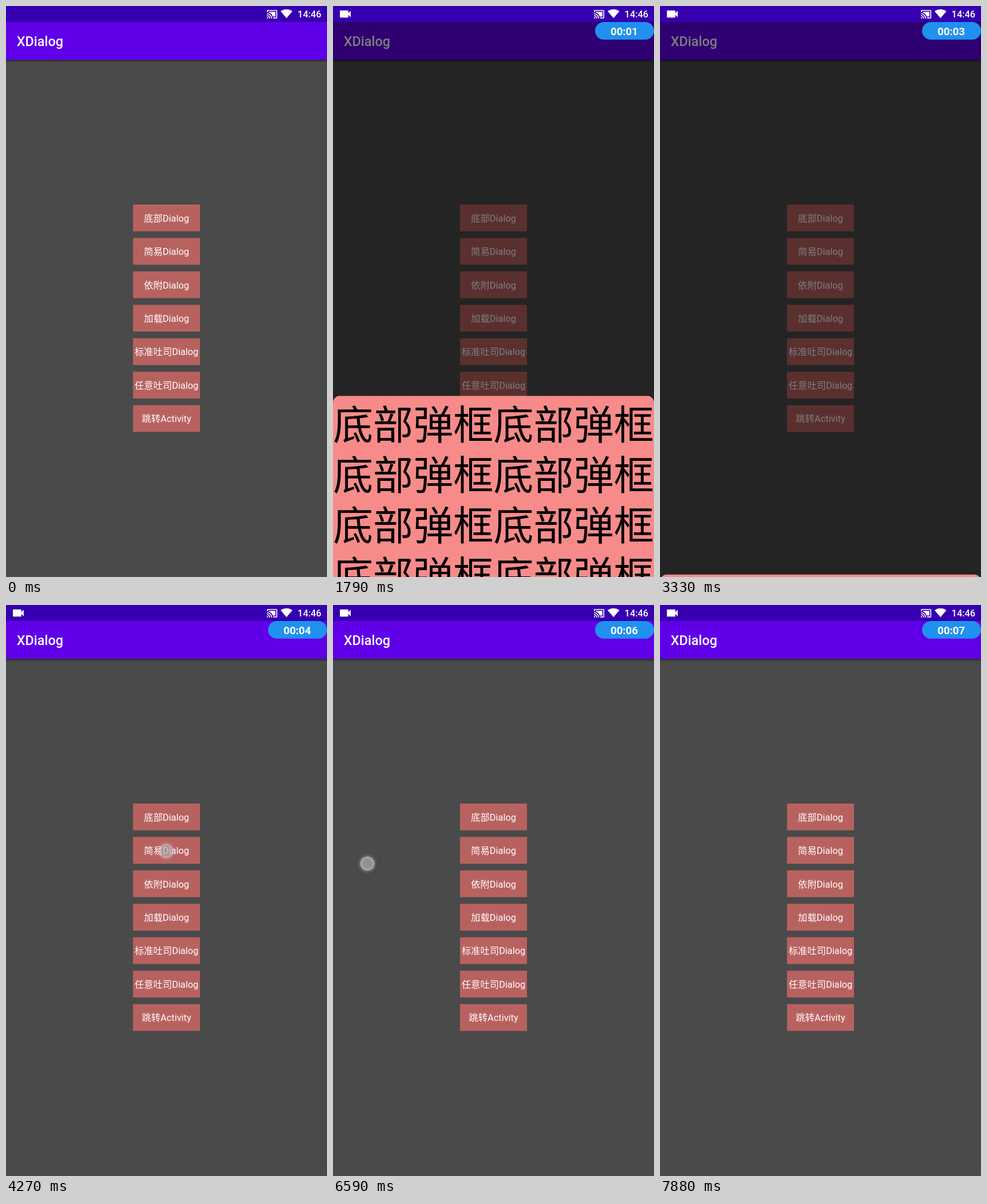
An HTML page that plays this animation: 561x998 px, repeating every 8 s.

```html
<!DOCTYPE html>
<html lang="zh-CN">
<head>
<meta charset="utf-8">
<title>XDialog</title>
<style>
  html, body { margin: 0; width: 100%; height: 100%; overflow: hidden; background: #4a4a4a; }
  svg { display: block; width: 100vw; height: 100vh; }
  text { font-family: Roboto, "Noto Sans CJK SC", "Noto Sans CJK", sans-serif; font-size: 16.36px; fill: #fff; }
  .mid { text-anchor: middle; }
</style>
</head>
<body>
<svg viewBox="0 0 561 998" preserveAspectRatio="none">
  <defs>
    <linearGradient id="shade" x2="0" y2="1">
      <stop stop-opacity=".45"/><stop offset="1" stop-opacity="0"/>
    </linearGradient>
    <radialGradient id="glow">
      <stop stop-color="#a6a6a6" stop-opacity=".92"/>
      <stop offset=".5" stop-color="#b0b0b0" stop-opacity=".92"/>
      <stop offset=".66" stop-color="#d2d0da" stop-opacity=".92"/>
      <stop offset=".73" stop-color="#ccc" stop-opacity=".3"/>
      <stop offset="1" stop-color="#ccc" stop-opacity="0"/>
    </radialGradient>
  </defs>

  <rect width="561" height="998" fill="#4a4a4a"/>
  <rect y="94" width="561" height="5" fill="url(#shade)"/>
  <rect y="28" width="561" height="66" fill="#6000e8"/>
  <text x="18.7" y="69.6" style="font-size:23.4px;font-weight:500">XDialog</text>
  <g id="buttons"></g>
  <rect y="997" width="561" height="1" fill="#5a474b"/>

  <rect id="dim" y="28" width="561" height="970" opacity=".51"/>
  <g id="sheet">
    <rect y="639.5" width="561" height="380" rx="11.7" fill="#f78b8a"/>
  </g>
  <g id="confirm">
    <rect x="134" y="425" width="292.2" height="175.4" rx="11.7" fill="#fff"/>
    <text class="mid" x="280" y="496.5" style="font-size:20.4px;fill:#000">简易的确认Dialog</text>
    <text class="mid" x="386.5" y="572.6" style="fill:#1a94f0">确定</text>
  </g>

  <rect width="561" height="28" fill="#3600b0"/>
  <g fill="#fff">
    <path transform="translate(455.2 4.5) scale(.82)" d="M1 18v3h3c0-1.66-1.34-3-3-3zM1 14v2c2.76 0 5 2.24 5 5h2c0-3.87-3.13-7-7-7zM19 7H5v1.63c3.96 1.28 7.09 4.41 8.37 8.37H19zM1 10v2c4.97 0 9 4.03 9 9h2c0-6.08-4.93-11-11-11zM21 3H3c-1.1 0-2 .9-2 2v3h2V5h18v14h-7v2h7c1.1 0 2-.9 2-2V5c0-1.1-.9-2-2-2z"/>
    <path transform="translate(479.7 3.3) scale(.88 .84)" d="M12 21.5L23.64 7C23.2 6.66 18.7 3 12 3S.81 6.66.36 7z"/>
  </g>
  <text x="509.6" y="20" style="font-weight:500">14:46</text>
  <g id="recorder">
    <path fill="#fff" transform="translate(8.9 1.4) scale(1.05)" d="M17 10.5V7c0-.55-.45-1-1-1H4c-.55 0-1 .45-1 1v10c0 .55.45 1 1 1h12c.55 0 1-.45 1-1v-3.5l4 4v-11z"/>
    <rect x="458" y="28" width="103" height="30.8" rx="15.4" fill="#2091ef"/>
    <text id="timer" class="mid" x="509" y="50.8" style="font-size:18.7px;font-weight:700"></text>
  </g>
  <circle id="dot" r="17.5" fill="url(#glow)"/>
</svg>

<script>
const LOOP = 8000;
const $ = id => document.getElementById(id);
const [dim, sheet, confirmBox, recorder, timer, dot] =
  ['dim', 'sheet', 'confirm', 'recorder', 'timer', 'dot'].map($);

const labels = ['底部Dialog', '简易Dialog', '依附Dialog', '加载Dialog', '标准吐司Dialog', '任意吐司Dialog', '跳转Activity'];
$('buttons').innerHTML = labels.map((label, i) => {
  const y = 347 + i * 58.44;
  return `<rect x="222" y="${y}" width="117" height="46.75" fill="#b86260"/>
    <text class="mid" x="280.5" y="${y + 29.7}">${label}</text>`;
}).join('');

for (let i = 0; i < 4; i++) {
  sheet.insertAdjacentHTML('beforeend',
    `<text y="${716 + i * 88}" style="font-size:70.125px;fill:#000">底部弹框底部弹框</text>`);
}

const ticks = [1030, 2120, 3160, 4220, 5300, 6300, 7300];
const dims = [[1640, 3380], [4310, 5870], [6660, 7880]];
// start, end, x, y
const taps = [
  [1370, 1640, 278, 364], [2910, 3130, 81, 338], [4060, 4310, 280, 430],
  [5520, 5720, 386, 567], [6450, 6690, 60, 452]
];

const ramp = (t, a, b) => Math.min(1, Math.max(0, (t - a) / (b - a)));
const ease = p => (1 - Math.cos(Math.PI * p)) / 2;
const within = t => ([a, b]) => t >= a && t < b;
const show = (el, on) => el.setAttribute('visibility', on ? 'visible' : 'hidden');

// 0 when closed, 1 when fully open
const openness = (t, a, b, c, d) => ease(ramp(t, a, b)) - ease(ramp(t, c, d));

function draw(t) {
  recorder.setAttribute('opacity', ramp(t, 300, 560));
  timer.textContent = '00:0' + ticks.filter(k => t >= k).length;
  show(dim, dims.some(within(t)));

  const slide = openness(t, 1620, 1840, 3130, 3346);
  show(sheet, slide > 0);
  sheet.setAttribute('transform', `translate(0 ${358.5 * (1 - slide)})`);

  const pop = openness(t, 4310, 4520, 5690, 5870);
  const size = 0.7 + 0.3 * pop;
  show(confirmBox, pop > 0);
  confirmBox.setAttribute('opacity', pop);
  confirmBox.setAttribute('transform', `translate(280 512.7) scale(${size}) translate(-280 -512.7)`);

  const tap = taps.find(within(t));
  show(dot, tap);
  if (tap) {
    const [start, , x, y] = tap;
    dot.setAttribute('transform', `translate(${x} ${y})`);
    dot.setAttribute('opacity', 1 - 0.3 * (t - start) / 220);
  }
}

const begin = performance.now();
function frame() {
  draw((performance.now() - begin) % LOOP);
  requestAnimationFrame(frame);
}
frame();
</script>
</body>
</html>
```
